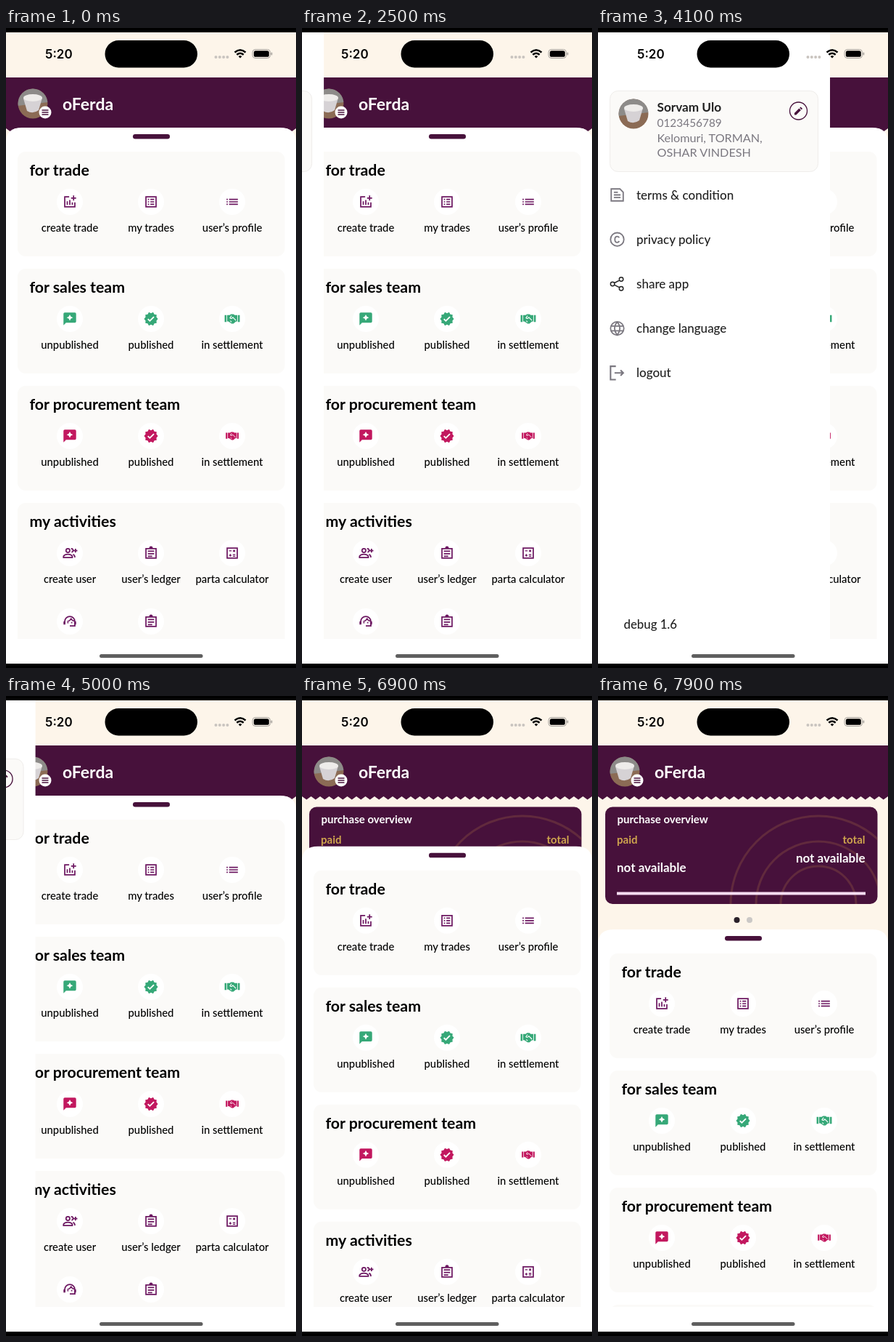
An HTML page for the animation above (8000 ms loop, 400 by 880 pixels).

```html
<!DOCTYPE html>
<html lang="en">
<head>
<meta charset="utf-8">
<style>
  html, body { margin: 0; width: 100%; height: 100%; overflow: hidden; background: #000; }
  svg { display: block; width: 400px; height: 880px; font-family: Lato, "Open Sans", sans-serif; }
  .line { fill: none; stroke: currentColor; stroke-width: 2; }
</style>
</head>
<body>
<svg id="stage" viewBox="0 0 400 880"></svg>
<script>
const PLUM = '#47113b', ICON = '#6d1862', GREEN = '#36a878', PINK = '#c2185f';
const CREAM = '#fdf5ea', CARD = '#fbfaf8', GREY = '#7b7880', GOLD = '#cfa54e';

const fill = d => `<path d="${d}" fill="currentColor"/>`;
const line = (d, w = 2) => `<path class="line" d="${d}" style="stroke-width:${w}"/>`;
const text = (str, x, y, size, color = '#000', weight = 400, anchor = 'start') =>
  `<text x="${x}" y="${y}" font-size="${size}" font-weight="${weight}" fill="${color}" text-anchor="${anchor}">${str}</text>`;
const rect = (x, y, w, h, r, color, extra = '') =>
  `<rect x="${x}" y="${y}" width="${w}" height="${h}" rx="${r}" fill="${color}" ${extra}/>`;
const disc = (x, y, r, color, extra = '') =>
  `<circle cx="${x}" cy="${y}" r="${r}" fill="${color}" ${extra}/>`;

// Icons live in a 24 x 24 box.
const icons = {
  chart: line('M11 4H4v16h16v-7M18 2v8M14 6h8M8 11v6M12 9v8M16 13v4'),
  table: line('M4 4h16v16H4zM7 8h2M11 8h6M7 12h2M11 12h6M7 16h2M11 16h6'),
  list: line('M3 8h2M7 8h14M3 12h2M7 12h14M3 16h2M7 16h14'),
  review: fill('M20 2H4Q2 2 2 4V22l4-4h14q2 0 2-2V4q0-2-2-2zM13.6 11.6L12 15l-1.6-3.4L7 10l3.4-1.6L12 5l1.6 3.4L17 10z'),
  verified: fill('M23 12l-2.4-2.8.3-3.7-3.6-.8-1.9-3.2L12 3 8.6 1.5 6.7 4.7l-3.6.8.3 3.7L1 12l2.4 2.8-.3 3.7 3.6.8 1.9 3.2L12 21l3.4 1.5 1.9-3.2 3.6-.8-.3-3.7zM10.1 16.7l-3.8-3.8 1.5-1.5 2.3 2.3 5.8-5.8 1.5 1.5z'),
  shake: fill('M0 6h3v11H0zM21 6h3v11h-3zM4 6h4l2-1.5h4L16 6h4v10h-2l-4 3.5h-3L6 16H4z') +
    '<path d="M11 7L8.5 10.5q2 2 4.500-1l5 5M9 15l2 2" fill="none" stroke="#fff" stroke-width="1.3"/>',
  people: line('M12 8a3 3 0 1 1-6 0a3 3 0 1 1 6 0M2 19v-2q2-3 7-3t7 3v2zM14 5q4 0 3 4l-2 2M17 14q3 1 3 5M21 5v6M18 8h6'),
  clipboard: line('M4 5h16v15H4zM7 9h10M7 13h10M7 17h7') + fill('M9 5q0-4 3-4t3 4z'),
  calc: line('M4 4h16v16H4z') + line('M7 8.500h4M13.500 7l3 3M16.500 7l-3 3M7 15.500h4M9 13.500v4M13 14.500h4M13 17h4', 1.5),
  agent: line('M4 15v-3a8 8 0 0 1 16 0v7h-8') + line('M8 12q5-1 6-5q1 4 5 4') +
    fill('M2 12h3v5H2zM19 12h3v5h-3zM8 13h2v2H8zM14 13h2v2h-2z'),
  page: line('M3 3h13l5 5v13H3zM7 8h6M7 12h10M7 16h10'),
  copyright: line('M22 12a10 10 0 1 1-20 0a10 10 0 1 1 20 0M15 9.500q-1-2-3-2q-3.500 0-3.500 4.500t3.500 4.500q2 0 3-2'),
  share: line('M8 12a3 3 0 1 1-6 0a3 3 0 1 1 6 0M21 5a3 3 0 1 1-6 0a3 3 0 1 1 6 0M21 19a3 3 0 1 1-6 0a3 3 0 1 1 6 0M8 10.500l7.500-4M8 13.500l7.500 4', 1.6),
  globe: line('M22 12a10 10 0 1 1-20 0a10 10 0 1 1 20 0M12 2q-8 10 0 20q8-10 0-20M3 8.500h18M3 15.500h18', 1.9),
  logout: line('M10 2H2v20h8M8 12h13M17 8l4 4l-4 4', 2.3),
  pencil: fill('M3 21v-4L13.500 6.500l4 4L7 21zM14.700 5.300L17 3l4 4l-2.300 2.300z')
};
const icon = (name, x, y, color, scale = .87) =>
  `<g transform="translate(${x} ${y}) scale(${scale}) translate(-12 -12)" color="${color}" fill-rule="evenodd">${icons[name].replace('<path ', '<path fill-rule="evenodd" ')}</g>`;

const avatar = (x, y) => `<g transform="translate(${x} ${y})" clip-path="url(#round)">
  ${disc(0, 0, 21, '#8b6b55')}<path d="M-21-21H21V-2L-21 3z" fill="#8d8b89"/>
  <path d="M-13-7L-8 10Q0 15 8 9L13-8z" fill="#d6d2d5"/>
  <ellipse cy="-8" rx="13" ry="5" fill="#eeecea"/></g>`;

function section(title, index, color, items) {
  const y = 170 + index * 161;
  const cells = items.map(([name, label, scale], i) => {
    const x = 88 + i % 3 * 112, cy = y + 69 + (i > 2 ? 94 : 0);
    return disc(x, cy, 18, '#fff') + icon(name, x, cy, color, scale) + text(label, x, cy + 41, 14.8, '#000', 500, 'middle');
  });
  return rect(16, y, 368.5, index === 3 ? 238 : 144, 11, CARD) + text(title, 32.5, y + 33, 21.3, '#000', 700) + cells.join('');
}

const deals = handScale => [['review', 'unpublished'], ['verified', 'published'], ['shake', 'in settlement', handScale]];
const sheet = `<path d="M0 900V157Q0 137 22 137H378Q400 137 400 157V900z" fill="#fff"/>` +
  rect(175, 146, 51, 6.5, 3.2, PLUM) +
  section('for trade', 0, ICON, [['chart', 'create trade'], ['table', 'my trades'], ['list', 'user’s profile']]) +
  section('for sales team', 1, GREEN, deals(.87)) +
  section('for procurement team', 2, PINK, deals(.74)) +
  section('my activities', 3, ICON, [['people', 'create user'], ['clipboard', 'user’s ledger'],
    ['calc', 'parta calculator'], ['agent', ''], ['clipboard', '']]);

const teeth = Array.from({ length: 32 }, () => 'l-6.25 4.500l-6.25-4.500').join('');
const header = `<path d="M0 68H400V138${teeth}z" fill="${PLUM}"/>` + avatar(37, 104) +
  disc(54, 116, 8.5, '#fff') + `<path d="M49.500 113h9M49.500 116h9M49.500 119h9" stroke="${PLUM}" stroke-width="1.4"/>` +
  text('oFerda', 78, 113, 23, '#fff', 700);

const overview = rect(10, 152.5, 375.5, 133.5, 10, PLUM) +
  `<g clip-path="url(#panel)">${[121, 86, 52].map(r =>
    disc(304, 286, r, 'none', 'stroke="#c78a45" stroke-opacity=".2" stroke-width="3"')).join('')}</g>` +
  text('purchase overview', 26.5, 175, 15, '#fff', 700) +
  text('paid', 26, 203, 15, GOLD, 700) + text('total', 368.5, 203, 15, GOLD, 700, 'end') +
  text('not available', 26, 242, 17, '#fff', 700) + text('not available', 368.5, 229, 17, '#fff', 700, 'end') +
  rect(26, 269.5, 343, 4, 0, '#f6dcf2') + disc(191.5, 308, 4, '#2a2029') + disc(209, 308, 4, '#cbc8c6');

const menu = [['page', 'terms &amp; condition'], ['copyright', 'privacy policy'], ['share', 'share app'],
  ['globe', 'change language'], ['logout', 'logout']];
const drawer = rect(0, 6, 320, 868, 0, '#fff') +
  rect(16.5, 86.5, 287, 111, 11, CARD, 'stroke="#efedeb"') + avatar(49, 118) +
  text('Sorvam Ulo', 81.5, 115, 17.2, '#222', 700) + text('0123456789', 81.5, 136, 15.4, GREY) +
  text('Kelomuri, TORMAN,', 81.5, 157, 16.2, GREY) + text('OSHAR VINDESH', 81.5, 177, 16.2, GREY) +
  disc(276.5, 114, 12, 'none', `stroke="${PLUM}" stroke-width="1.3"`) + icon('pencil', 276.5, 114, PLUM, .62) +
  menu.map(([name, label], i) => {
    const y = 229.5 + i * 61.2;
    return icon(name, 26.5, y, name === 'share' ? '#222' : GREY, .92) + text(label, 53, y + 6, 17, '#222', 500);
  }).join('') + text('debug 1.6', 35.5, 825.5, 16.8, '#222', 500);

const statusBar = `<text x="54" y="42" font-size="17" font-weight="600" style="font-family:Inter,sans-serif">5:20</text>` +
  rect(136.5, 17, 127.5, 37.5, 18.7, '#000') +
  [289.5, 294.8, 300.1, 305.4].map(x => disc(x, 40, 2, '#c9c4bf')).join('') +
  `<path d="M315.500 33.500q7.500-6.500 15 0M318.300 36.800q4.700-4 9.400 0" fill="none" stroke="#000" stroke-width="2.500"/>
   <path d="M320.600 39q2.400-2 4.800 0L323 41.500z"/>` +
  rect(340, 29.5, 24.5, 12, 4, 'none', 'stroke="#a5a19c"') + rect(341.8, 31.2, 21, 8.6, 2.6, '#000') +
  rect(365.6, 33.5, 1.6, 4, .8, '#a5a19c');

const stage = document.getElementById('stage');
stage.innerHTML = `<defs>
    <clipPath id="round"><circle r="20.5"/></clipPath>
    <clipPath id="panel"><rect x="10" y="152.5" width="375.5" height="133.5" rx="10"/></clipPath>
    <clipPath id="view"><rect y="6" width="400" height="834"/></clipPath>
  </defs>` +
  rect(0, 0, 400, 880, 0, '#000') + rect(0, 6, 400, 868, 0, '#fff') +
  `<g clip-path="url(#view)">${rect(0, 6, 400, 834, 0, CREAM)}${overview}${header}<g id="sheet">${sheet}</g></g>` +
  `<g id="drawer">${drawer}</g>` + statusBar + rect(129, 861, 142.5, 5, 2.5, '#5f5f5f');

const sheetNode = document.getElementById('sheet');
const drawerNode = document.getElementById('drawer');

// Critically damped spring from 0 to 1.
function spring(ms) {
  const x = Math.max(0, ms) * .0233;
  return 1 - (1 + x) * Math.exp(-x);
}

function draw() {
  const t = Math.floor(performance.now() % 8000 / 100) * 100; // screen updates ten times a second
  const open = spring(t - 2478) - spring(t - 4846);
  const drop = t >= 7700 ? 184 : 184 * (1 - Math.exp(-.0062 * Math.max(0, t - 6823)));
  drawerNode.setAttribute('transform', `translate(${320 * (open - 1)} 0)`);
  sheetNode.setAttribute('transform', `translate(0 ${drop})`);
  requestAnimationFrame(draw);
}
draw();
</script>
</body>
</html>
```
